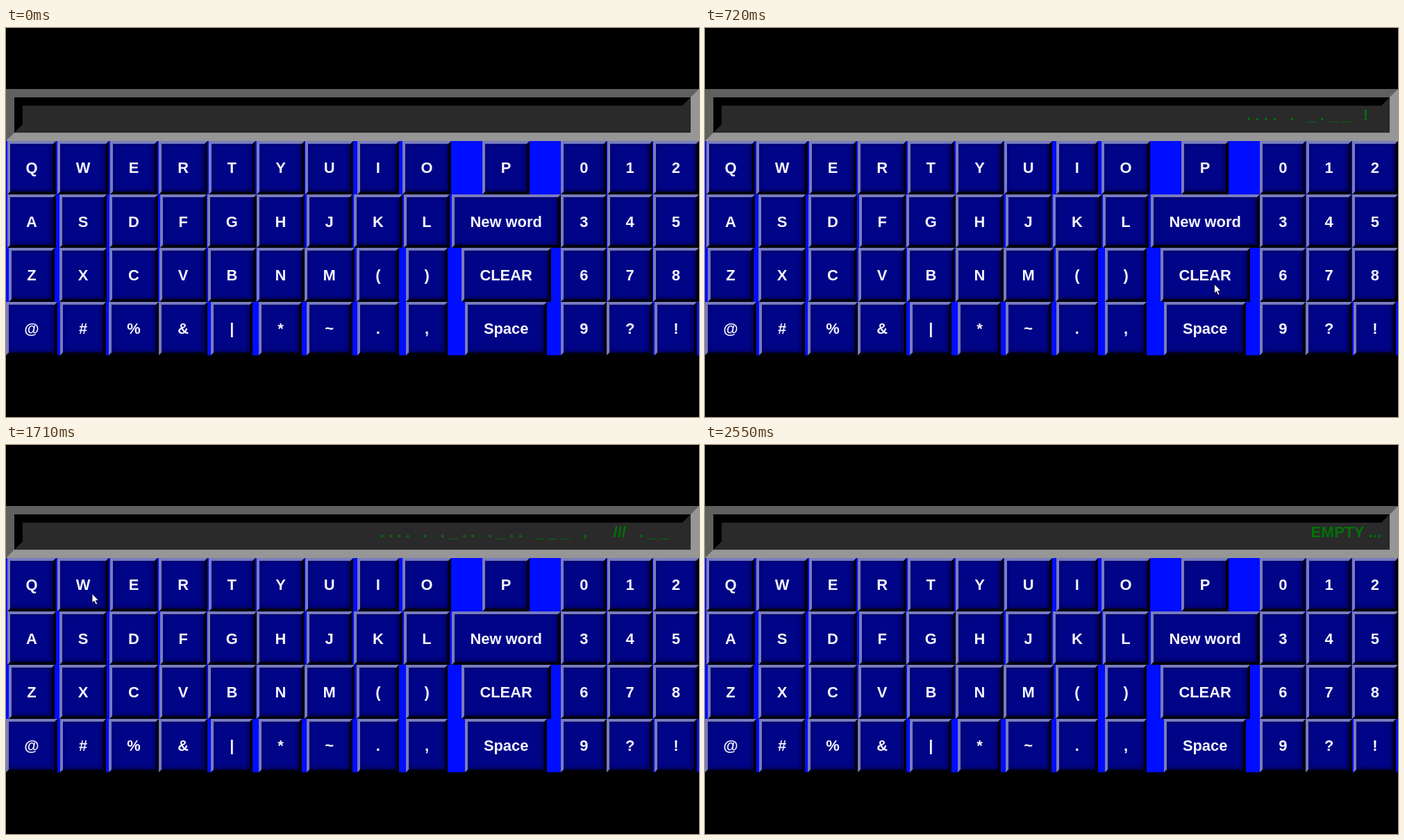
An HTML page that plays this animation: 998 by 561 pixels, repeating every 2.58 s.

```html
<!DOCTYPE html>
<html lang="en">
<head>
<meta charset="utf-8">
<title>Morse keyboard</title>
<style>
  html, body { margin: 0; width: 100%; height: 100%; overflow: hidden; background: #000; }
  #stage {
    position: relative; width: 998px; height: 561px; overflow: hidden; background: #000;
    font: bold 21.9px/26px "Liberation Sans", Arial, sans-serif;
  }
  .frame {
    position: absolute; left: 0; top: 88px; box-sizing: border-box; width: 998px; height: 75px;
    border: 12px solid; border-color: #606060 #969696 #969696 #606060;
  }
  #out {
    box-sizing: border-box; height: 51px; background: #2a2a2a;
    border: 12px solid; border-color: #000 #2a2a2a #2a2a2a #000;
    color: #007206; font-size: 22.4px; line-height: 28px; text-align: right; white-space: pre;
  }
  #keys {
    position: absolute; left: 0; top: 162.6px; width: 998px; height: 309.4px; background: #000eff;
    display: grid; grid-template-rows: repeat(4, 1fr); justify-items: center;
    grid-template-columns: 74px 74px 72px repeat(6, 70.2px) 158px repeat(3, 66.3px);
  }
  .key {
    display: flex; align-items: center; box-sizing: border-box; padding: 2px 22.75px 0;
    background: #000486; color: #f4f6ff; white-space: pre;
    border: 4px solid; border-color: #787cbe #00000c #00000c #787cbe;
    box-shadow: inset -2px -2px 5px #000050, inset 0 0 4px #000064;
  }
  #cursor { position: absolute; left: 0; top: 0; width: 14px; height: 20px; overflow: visible; }
</style>
</head>
<body>
<div id="stage">
  <div class="frame"><div id="out"></div></div>
  <div id="keys"></div>
  <svg id="cursor" viewBox="0 0 14 20">
    <path d="M0 0V13.2L3 10.4 5.4 15.8 7.6 14.8 5.3 9.6H9.4Z" fill="#fff" stroke="#000018" stroke-width=".8"/>
  </svg>
</div>
<script>
const LOOP = 2580, STEP = 30;
const keys = document.getElementById('keys');
const out = document.getElementById('out');
const cursor = document.getElementById('cursor');

const layout = `Q W E R T Y U I O P 0 1 2
  A S D F G H J K L New_word 3 4 5
  Z X C V B N M ( ) CLEAR 6 7 8
  @ # % & | * ~ . , Space 9 ? !`;
const keyFor = {};
for (const label of layout.split(/\s+/)) {
  const key = keyFor[label] = document.createElement('div');
  key.className = 'key';
  key.textContent = label.replace('_', ' ');
  keys.append(key);
}

const nbsp = '\u00a0', gap = nbsp.repeat(3), empty = 'EMPTY ...';
const morse = {
  H: '....', E: '.', Y: '_.__', L: '._..', O: '___', W: '.__', R: '._.', D: '_..'
};
const encode = label =>
  (label === 'New_word' ? gap + '///' : [...(morse[label] || label)].join(nbsp)) + gap;

// The pointer lands a little below and right of a key's centre.
const aim = key => ({
  x: key.offsetLeft + key.offsetWidth / 2 + 13,
  y: keys.offsetTop + key.offsetTop + key.offsetHeight / 2 + 13
});

// Each phrase is typed at an even pace.
const presses = [{ t: 250, x: 421, y: 290, text: '' }];
function type(start, pace, labels) {
  labels.split(' ').forEach((label, i) => {
    const shown = presses[presses.length - 1].text.replace(empty, '');
    const text = label === 'CLEAR' ? empty : shown + encode(label);
    presses.push({ t: start + i * pace, text, ...aim(keyFor[label]) });
  });
}
type(330, 100, 'H E Y ! CLEAR');
type(840, 82, 'H E L L O');
type(1320, 180, ', New_word W');
type(1815, 75, 'O R L D ! CLEAR');

// Rest on a key, glide to the next, rest again before pressing.
function glide(u) {
  const v = Math.min(1, Math.max(0, (u - 0.25) / 0.6));
  return v * v * (3 - 2 * v);
}

function draw() {
  const t = Math.floor(performance.now() % LOOP / STEP) * STEP;
  const last = presses[presses.length - 1];
  const a = presses.filter(p => p.t <= t).pop();
  const b = presses.find(p => p.t > t) || last;
  const text = a ? a.text : '';
  if (out.textContent !== text) out.textContent = text;
  cursor.style.visibility = a && t < last.t + 240 ? 'visible' : 'hidden';
  if (a) {
    const e = a === b ? 0 : glide((t - a.t) / (b.t - a.t));
    cursor.style.transform = `translate(${a.x + (b.x - a.x) * e}px, ${a.y + (b.y - a.y) * e}px)`;
  }
  requestAnimationFrame(draw);
}
draw();
</script>
</body>
</html>
```
